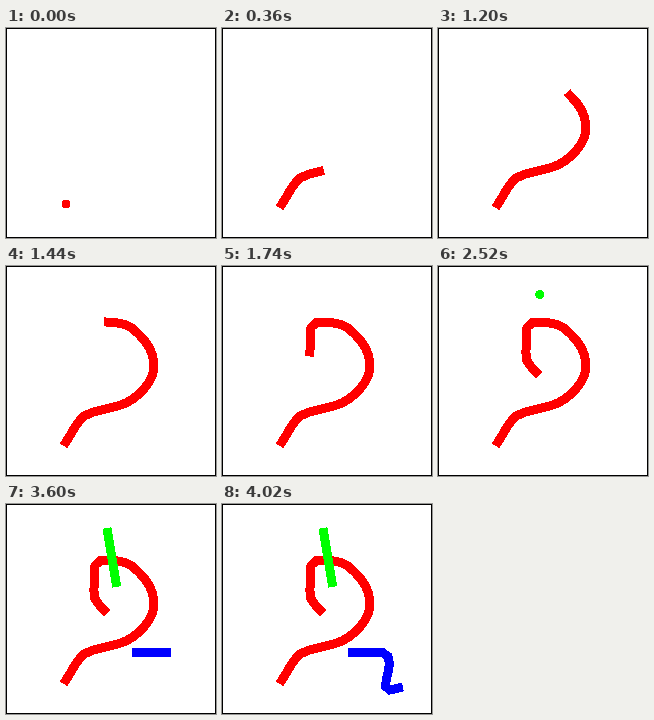
An HTML page that plays this animation: 210x210 px, repeating every 4.62 s.

```html
<!DOCTYPE html>
<html lang="en">
<head>
<meta charset="utf-8">
<title>Pen strokes</title>
<style>
  html, body { margin: 0; width: 100%; height: 100%; overflow: hidden; background: #fff; }
  svg { display: block; }
</style>
</head>
<body>
<svg id="stage" width="210" height="210" viewBox="0 0 210 210" fill="none" shape-rendering="crispEdges">
  <rect x=".5" y=".5" width="209" height="209" stroke="#000"/>
</svg>
<script>
const STEP = 60, LOOP = 4620, WIDTH = 9;

// Keys are [step, x, y]: where the pen is at a few moments of each stroke.
const strokes = [
  { color: '#f00', start: 0, keys: [
    [0, 60, 176], [4, 78, 150], [6, 97.5, 143.5], [9, 120, 137], [12, 138, 123],
    [15, 148, 103], [18, 143.5, 82], [20, 132, 67.5], [22, 119, 58.5], [25, 94.5, 56.5],
    [26, 89, 61.5], [28, 88.5, 77.5], [30, 88.5, 94], [32, 98, 106]] },
  { color: '#0f0', start: 2520, keys: [[0, 101.7, 28.5], [5, 110, 78.5]] },
  { color: '#00f', start: 3420, keys: [
    [0, 130.5, 148.5], [2, 150.5, 148.5], [3, 160.5, 148.5], [4, 166, 152.5],
    [5, 167.5, 160], [8, 163.5, 182.5], [9, 168, 186], [10, 176.5, 184]] }
];

// Speed of the pen along one axis at a key, taken from its neighbours.
function slope(keys, i, axis) {
  const before = keys[Math.max(i - 1, 0)];
  const after = keys[Math.min(i + 1, keys.length - 1)];
  return (after[axis] - before[axis]) / (after[0] - before[0]);
}

// Cubic Hermite interpolation between the keys.
function penAt(keys, step) {
  const i = Math.max(1, keys.findIndex(key => key[0] >= step));
  const a = keys[i - 1], b = keys[i];
  const span = b[0] - a[0], u = (step - a[0]) / span, v = 1 - u;
  return [1, 2].map(axis =>
    a[axis] * v * v * (1 + 2 * u) + b[axis] * u * u * (1 + 2 * v) +
    span * u * v * (slope(keys, i - 1, axis) * v - slope(keys, i, axis) * u));
}

const stage = document.getElementById('stage');
for (const stroke of strokes) {
  const { color, keys } = stroke;
  stroke.points = Array.from({ length: keys.at(-1)[0] + 1 }, (_, step) => penAt(keys, step));
  stroke.path = document.createElementNS(stage.namespaceURI, 'path');
  stroke.path.setAttribute('stroke', color);
  stroke.path.setAttribute('stroke-width', WIDTH);
  stage.append(stroke.path);
}

function draw(time) {
  for (const { points, path, start } of strokes) {
    const count = Math.max(0, Math.floor((time - start) / STEP) + 1);
    const shown = points.slice(0, count);
    // A single point is a round dot; longer strokes have square ends.
    path.setAttribute('stroke-linecap', count === 1 ? 'round' : 'square');
    path.setAttribute('d', count ? `M${shown[0]}L${shown.join(' ')}` : '');
  }
}

const begin = performance.now();
function tick() {
  draw((performance.now() - begin) % LOOP);
  requestAnimationFrame(tick);
}
tick();
</script>
</body>
</html>
```
